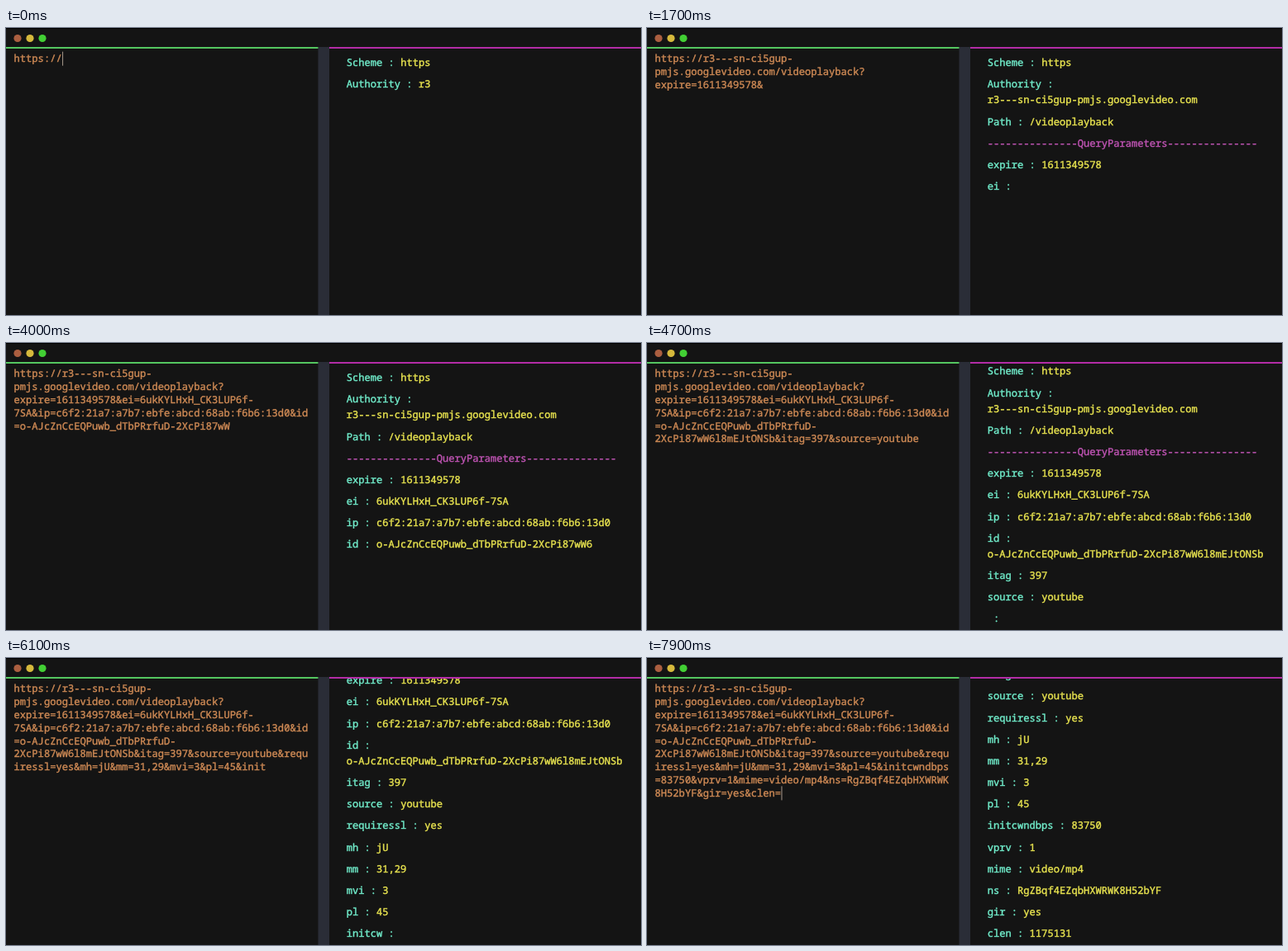
An HTML page that plays this animation: 768x348 px, repeating every 8000 ms.

```html
<!DOCTYPE html>
<html lang="en">
<head>
<meta charset="utf-8">
<title>URL parser</title>
<style>
  html, body { margin: 0; width: 100%; height: 100%; overflow: hidden; background: #141414; }
  svg { display: block; }
  text {
    font: 500 12.1px "Roboto Mono", "Noto Sans Mono", "DejaVu Sans Mono", monospace;
    white-space: pre;
    text-rendering: geometricPrecision;
    font-variant-ligatures: none;
    fill: currentColor;
    stroke: currentColor;
    stroke-width: 0.4px;
  }
  .url { color: #cf8a55; }
  .key { color: #72efcd; }
  .value { color: #ebe650; }
  .heading { color: #c054b4; }
</style>
</head>
<body>
<svg width="768" height="348" viewBox="0 0 768 348">
  <clipPath id="pane"><rect x="391" y="25" width="377" height="323"/></clipPath>
  <rect width="768" height="348" fill="#141414"/>
  <rect width="768" height="1" fill="#000"/>
  <circle cx="14" cy="12.5" r="4.6" fill="#ab5f40"/>
  <circle cx="29" cy="12.5" r="4.6" fill="#d6b93c"/>
  <circle cx="44" cy="12.5" r="4.6" fill="#42cf34"/>
  <rect x="377.5" y="23" width="13.5" height="325" fill="#2a2d37"/>
  <rect y="23" width="377.5" height="2" fill="#54c660"/>
  <rect x="391" y="23" width="377" height="2" fill="#b32ca6"/>
  <g id="input"></g>
  <rect id="caret" width="1" height="17" fill="#a89a8c"/>
  <g clip-path="url(#pane)"><g id="output"></g></g>
</svg>
<script>
const URL_TEXT = 'https://r3---sn-ci5gup-pmjs.googlevideo.com/videoplayback?' +
  'expire=1611349578&ei=6ukKYLHxH_CK3LUP6f-7SA' +
  '&ip=c6f2:21a7:a7b7:ebfe:abcd:68ab:f6b6:13d0' +
  '&id=o-AJcZnCcEQPuwb_dTbPRrfuD-2XcPi87wW6l8mEJtONSb&itag=397&source=youtube' +
  '&requiressl=yes&mh=jU&mm=31,29&mvi=3&pl=45&initcwndbps=83750&vprv=1' +
  '&mime=video/mp4&ns=RgZBqf4EZqbHXWRWK8H52bYF&gir=yes&clen=1175131';

const LOOP = 8000, STEP = 100;
const CHAR = 7.26;
const LEFT = { x: 9.6, y: 41.2, line: 15.84, cols: 49 };
const RIGHT = { x: 411.8, y: 46.2, row: 26.17, wrap: 19.1, cols: 46, last: 338.3 };

// Typing pace: [ms, characters in the input, characters parsed]
const PACE = [
  [0, 8, 10], [1700, 76, 78], [2700, 123, 126], [3200, 145, 146],
  [4700, 218, 219], [5600, 248, 249], [6700, 286, 290], [7900, 342, 349]
];

const input = document.getElementById('input');
const output = document.getElementById('output');
const caret = document.getElementById('caret');

function typed(t, column) {
  const i = Math.max(1, PACE.findIndex(p => p[0] >= t));
  const a = PACE[i - 1], b = PACE[i];
  const k = (t - a[0]) / (b[0] - a[0]);
  return URL_TEXT.slice(0, Math.floor(a[column] + (b[column] - a[column]) * k + 1e-6));
}

function addText(parent, x, y, str, cls) {
  const el = document.createElementNS('http://www.w3.org/2000/svg', 'text');
  el.setAttribute('x', x);
  el.setAttribute('y', y);
  el.setAttribute('class', cls);
  el.textContent = str;
  parent.append(el);
}

// Break after the last hyphen or question mark that fits, else mid-word
function wrap(str, cols) {
  const lines = [];
  while (str.length > cols) {
    const head = str.slice(0, cols);
    const cut = Math.max(head.lastIndexOf('-'), head.lastIndexOf('?')) + 1 || cols;
    lines.push(str.slice(0, cut));
    str = str.slice(cut);
  }
  return [...lines, str];
}

function parse(url) {
  const [, scheme, authority, path, query] = url.match(/^(\w+):\/\/([^/]*)([^?]*)\??(.*)$/);
  const rows = [['Scheme', scheme], ['Authority', authority]];
  if (path) rows.push(['Path', path]);
  if (url.includes('?')) {
    rows.push(null);
    for (const part of query.split('&')) {
      const [key, value = ''] = part.split('=');
      rows.push([key, value]);
    }
  }
  return rows;
}

function drawInput(t) {
  const lines = wrap(typed(t, 1), LEFT.cols);
  input.replaceChildren();
  lines.forEach((line, i) => addText(input, LEFT.x, LEFT.y + i * LEFT.line, line, 'url'));
  const n = lines.length - 1;
  caret.setAttribute('x', LEFT.x + lines[n].length * CHAR + 0.4);
  caret.setAttribute('y', LEFT.y + n * LEFT.line - 12.5);
  caret.style.display = t < 300 || t >= 7800 ? '' : 'none';
}

function drawOutput(t) {
  const { x } = RIGHT;
  const dashes = '-'.repeat(15);
  let y = RIGHT.y, bottom = y;
  output.replaceChildren();
  for (const row of parse(typed(t, 2))) {
    if (!row) {
      addText(output, x, y, dashes + 'QueryParameters' + dashes, 'heading');
    } else {
      const label = row[0] + ' : ', value = row[1];
      addText(output, x, y, label, 'key');
      if (label.length + value.length > RIGHT.cols) {
        y += RIGHT.wrap;
        addText(output, x, y, value, 'value');
      } else {
        addText(output, x + label.length * CHAR, y, value, 'value');
      }
    }
    bottom = y;
    y += RIGHT.row;
  }
  const scroll = Math.max(0, bottom - RIGHT.last);
  output.setAttribute('transform', `translate(0 ${-scroll})`);
}

let shown = -1;
const start = performance.now();

function frame() {
  const elapsed = Math.max(0, performance.now() - start) % LOOP;
  const t = Math.floor(elapsed / STEP) * STEP;
  if (t !== shown) {
    shown = t;
    drawInput(t);
    drawOutput(t);
  }
  requestAnimationFrame(frame);
}
frame();
</script>
</body>
</html>
```
